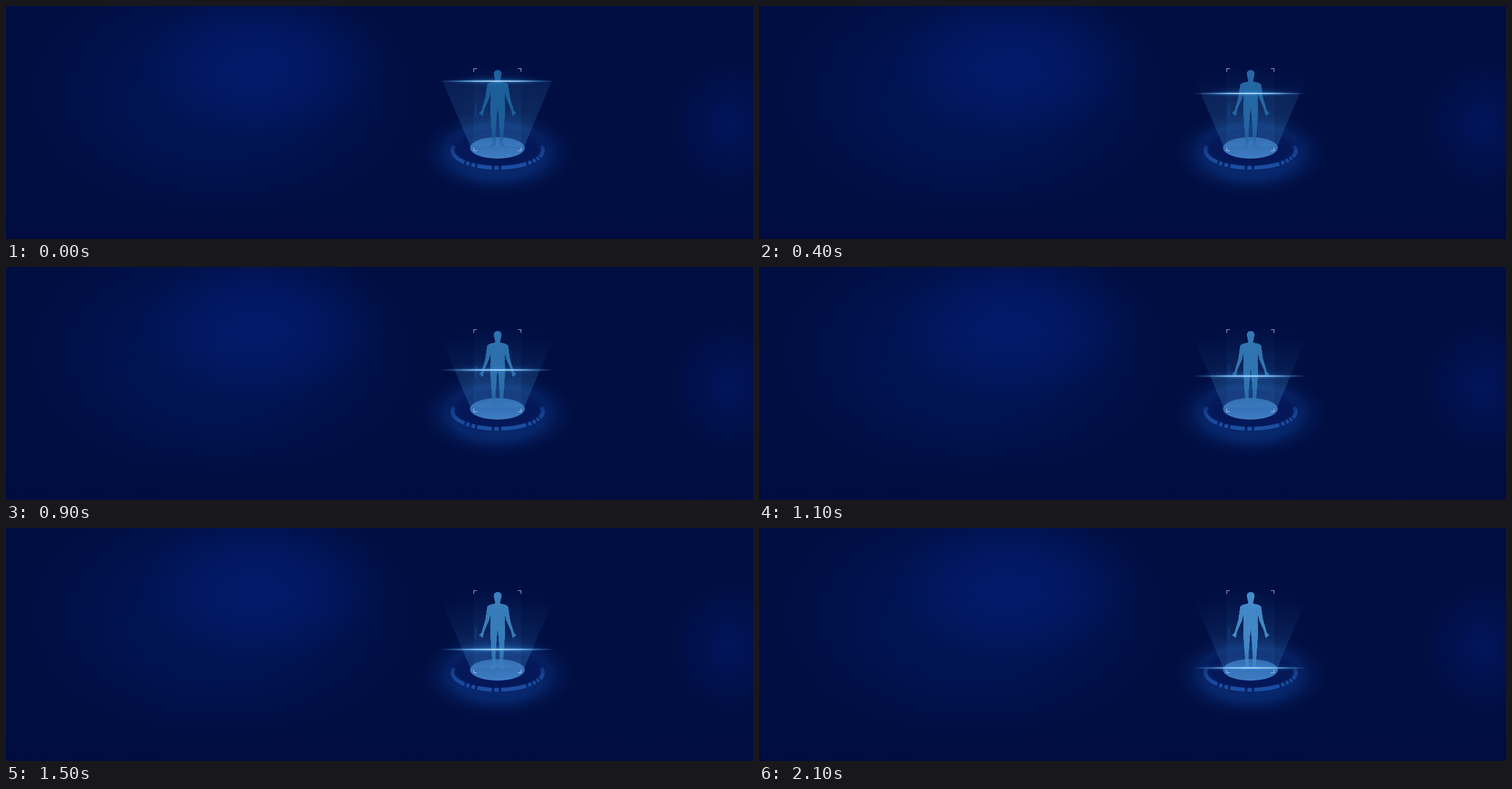
An HTML page with a canvas that plays this animation: 1280 px wide and 400 px high, repeating every 2200 ms.

```html
<!DOCTYPE html>
<html lang="en">
<head>
<meta charset="utf-8">
<title>Body scan</title>
<style>
  html, body { margin: 0; width: 100%; height: 100%; overflow: hidden; background: #000e42; }
  canvas { display: block; }
</style>
</head>
<body>
<canvas id="stage" width="1280" height="400"></canvas>
<script>
const WIDTH = 1280, HEIGHT = 400, LOOP = 2200, STEP = 100, CX = 842.5;
const mix = (a, b, k) => a + (b - a) * k;
const rgba = (rgb, a) => `rgba(${rgb},${a})`;
const stage = document.getElementById('stage').getContext('2d');

function layer() {
  const canvas = document.createElement('canvas');
  canvas.width = WIDTH;
  canvas.height = HEIGHT;
  return canvas.getContext('2d');
}

// Colour ramp with evenly spaced alphas.
function shade(gradient, rgb, alphas) {
  alphas.forEach((a, i) => gradient.addColorStop(i / (alphas.length - 1), rgba(rgb, a)));
  return gradient;
}
const fadeY = (c, y0, y1, rgb, ...alphas) => shade(c.createLinearGradient(0, y0, 0, y1), rgb, alphas);
const fadeX = (c, x0, x1, rgb, ...alphas) => shade(c.createLinearGradient(x0, 0, x1, 0), rgb, alphas);

// Soft ellipse, alphas running from its centre to its rim.
function glow(c, x, y, rx, ry, rgb, ...alphas) {
  c.save();
  c.translate(x, y);
  c.scale(rx, ry);
  c.fillStyle = shade(c.createRadialGradient(0, 0, 0, 0, 0, 1), rgb, alphas);
  c.fillRect(-1, -1, 2, 2);
  c.restore();
}

// Staggered dots that fade towards the rim of an ellipse.
function dotField(c, x, y, rx, ry, rgb, alpha) {
  for (let row = 0, py = y - ry; py < y + ry; row++, py += 4) {
    for (let px = x - rx + (row % 2) * 3; px < x + rx; px += 6) {
      const fade = 1 - Math.hypot((px - x) / rx, (py - y) / ry);
      if (fade <= 0) continue;
      c.fillStyle = rgba(rgb, alpha * Math.min(1, fade * 1.7));
      c.fillRect(px, py, 1, 1);
    }
  }
}

function drawBackground(c) {
  c.fillStyle = '#000e42';
  c.fillRect(0, 0, WIDTH, HEIGHT);
  glow(c, 370, 150, 340, 220, '2,26,104', .44, .42, .36, .16, 0);
  glow(c, 440, 100, 210, 130, '4,32,130', .5, .42, .22, 0);
  glow(c, 1238, 205, 98, 108, '3,24,112', .5, .38, .22, .14, 0);
  dotField(c, 350, 192, 200, 120, '16,72,165', .55);
  dotField(c, 1250, 205, 72, 120, '20,60,165', .55);
  c.fillStyle = fadeY(c, 320, HEIGHT, '2,9,56', 0, .35);
  c.fillRect(0, 320, WIDTH, 80);
}

function drawRing(c) {
  glow(c, CX, 252, 132, 74, '17,70,160', .5, .5, .48, .42, .13, 0);
  glow(c, CX, 244, 90, 40, '3,19,82', .85, .85, .82, .75, 0);
  // Clusters of cuts: middle angle in degrees and count.
  const cuts = [[36, 4], [91.5, 2], [127, 3]].flatMap(([middle, count]) =>
    Array.from({ length: count }, (_, i) => middle + (i - (count - 1) / 2) * 8.7));
  c.lineWidth = 6.5;
  c.strokeStyle = fadeY(c, 230, 280, '30,86,172', 0, .55, .75, .9);
  [...cuts, 197].forEach((end, i) => {
    const from = i ? cuts[i - 1] + 1.6 : -15;
    c.beginPath();
    c.ellipse(CX, 248, 77.5, 29.7, 0, from * Math.PI / 180, (end - 1.6) * Math.PI / 180);
    c.stroke();
  });
}

function drawPlatform(c) {
  c.beginPath();
  c.ellipse(CX - .5, 243.5, 47, 18.5, 0, 0, Math.PI * 2);
  c.fillStyle = fadeY(c, 225, 262, '66,132,202', .68, .84, .94);
  c.fill();
}

function drawGrid(c) {
  for (let y = 110; y < 238; y += 4) {
    for (let x = 768; x < 926; x += 4) {
      const side = Math.min(1, (79 - Math.abs(x - 847)) / 30);
      c.fillStyle = rgba('50,120,200', .05 + .25 * side * Math.min(1, (y - 95) / 70));
      c.fillRect(x, y, 1, 1);
    }
  }
}

function beamPath(c) {
  c.beginPath();
  c.moveTo(744, 120);
  c.lineTo(939, 120);
  c.lineTo(888, 241);
  c.lineTo(796, 241);
  c.closePath();
}

function drawBeam(c) {
  beamPath(c);
  c.fillStyle = fadeY(c, 120, 241, '60,140,205', 0, .07, .15, .27);
  c.fill();
  c.fillStyle = fadeY(c, 107, 241, '50,130,205', .02, .12);
  c.fillRect(801, 107, 82, 134);
}

function drawLowerBeam(c, y) {
  c.save();
  beamPath(c);
  c.clip();
  c.fillStyle = fadeY(c, y, 242, '70,150,210', .11, .03);
  c.fillRect(740, y, 205, 242 - y);
  c.restore();
}

function drawBrackets(c) {
  c.strokeStyle = 'rgba(190,214,240,.85)';
  c.lineWidth = 1.1;
  for (const sx of [-1, 1]) for (const sy of [-1, 1]) {
    const x = 842 + sx * 40.5, y = 178 + sy * 70.5;
    c.beginPath();
    c.moveTo(x, y - 5.5 * sy);
    c.lineTo(x, y);
    c.lineTo(x - 5.5 * sx, y);
    c.stroke();
  }
}

// Tapered limb through joints of [distance from axis, y, radius], drawn on both sides.
function limb(c, ...joints) {
  for (let i = 1; i < joints.length; i++) {
    for (let k = 0; k <= 1; k += .02) {
      const [d, y, r] = joints[i].map((end, n) => mix(joints[i - 1][n], end, k));
      for (const side of [-1, 1]) {
        c.beginPath();
        c.arc(CX + side * d, y, r, 0, Math.PI * 2);
        c.fill();
      }
    }
  }
}

function drawFigure(c) {
  limb(c, [0, 116.3, 6.3], [0, 122.8, 4.8], [0, 131, 3.8]);     // head and neck
  limb(c, [2, 132, 2.5], [13, 135.8, 3.6]);                     // shoulder
  limb(c, [14, 137, 4], [18, 158, 2.9], [25.3, 178, 1.7]);      // arm
  limb(c, [25.8, 180, 1.9], [26.8, 187, 1.4]);                  // hand
  limb(c, [27, 181, 1], [30.5, 184.5, .9]);                     // thumb
  limb(c, [0, 138, 5], [0, 172, 6]);                            // spine
  limb(c, [7.5, 139, 6], [6.4, 161, 5.3], [6.7, 179, 5.9],
    [7, 208, 3.7], [6, 238, 2.2], [12.5, 242, 1.4]);            // trunk, leg and foot
}

function tintBody(c, k) {
  const rgb = [mix(30, 72, k), mix(99, 146, k), mix(157, 208, k)].map(Math.round).join();
  c.globalCompositeOperation = 'copy';
  c.drawImage(figure.canvas, 0, 0);
  c.globalCompositeOperation = 'source-in';
  c.fillStyle = fadeY(c, 110, 244, rgb, .97, .95, .95, .9, mix(.35, .65, k));
  c.fillRect(0, 0, WIDTH, HEIGHT);
  c.globalCompositeOperation = 'source-atop';
  c.fillStyle = 'rgba(15,65,140,.1)';
  for (let i = 134; i < 238; i += 4) {
    c.fillRect(810, i, 65, 1);
    c.fillRect(678 + i, 134, 1, 104);
  }
}

function drawBars(c, flash) {
  const bar = (x, y, w, h, rest) => {
    c.fillStyle = rgba('40,105,190', mix(rest, .75, flash));
    c.fillRect(x, y, w, h);
  };
  bar(804, 169, 2, 21, .3);
  bar(808, 164, 1, 33, .12);
  bar(865, 144, 2, 16, 0);
  bar(870, 176, 1, 22, .1);
}

function drawScanLine(c, y) {
  glow(c, 841, y - 1, 90, 11, '40,125,210', .25, .1, 0);
  glow(c, 841, y, 96, 4.5, '70,165,245', .5, .3, 0);
  c.fillStyle = fadeX(c, 742, 940, '120,190,245', 0, .4, .8, .85, .8, .4, 0);
  c.fillRect(742, y - .9, 198, 1.8);
  c.fillStyle = fadeX(c, 775, 907, '230,246,255', 0, .55, .9, .55, 0);
  c.fillRect(775, y - .7, 132, 1.4);
}

const backdrop = layer(), figure = layer(), body = layer();
[drawBackground, drawRing, drawGrid, drawBeam, drawPlatform].forEach(part => part(backdrop));
drawFigure(figure);

function draw(now) {
  const time = Math.floor(now % LOOP / STEP) * STEP;
  const progress = time / (LOOP - STEP);
  const lineY = mix(129, 240.3, progress);
  tintBody(body, progress);
  stage.drawImage(backdrop.canvas, 0, 0);
  drawLowerBeam(stage, lineY);
  drawBars(stage, Math.max(0, 1 - Math.abs(time - 700) / 250));
  stage.drawImage(body.canvas, 0, 0);
  drawBrackets(stage);
  drawScanLine(stage, lineY);
}

const start = performance.now();
function tick() {
  draw(performance.now() - start);
  requestAnimationFrame(tick);
}
tick();
</script>
</body>
</html>
```
